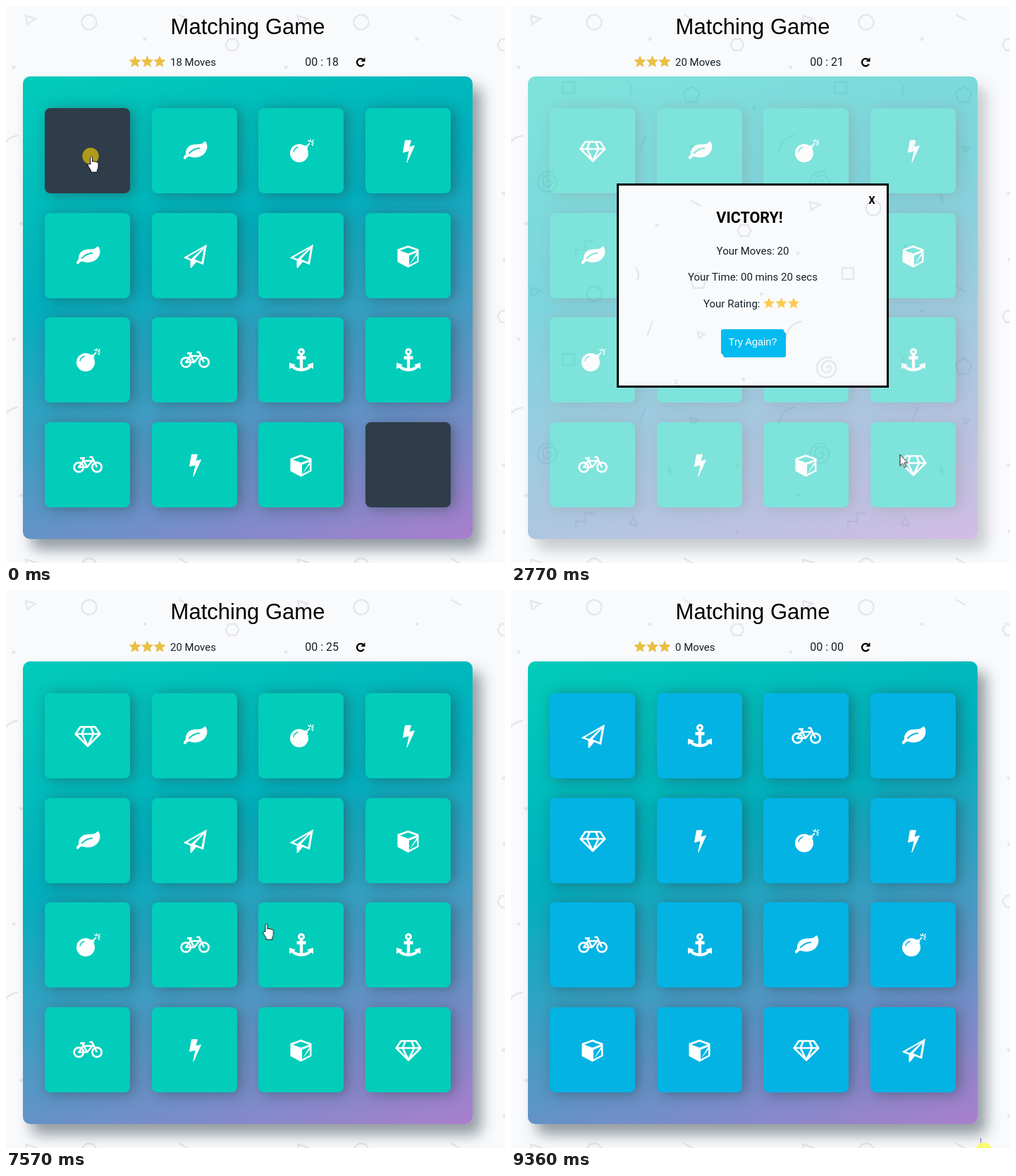
Write an HTML page that moves like this. It is 708 by 791 pixels and loops after 9530 ms.

```html
<!DOCTYPE html>
<html lang="en">
<head>
<meta charset="utf-8">
<title>Matching Game</title>
<style>
  html, body { margin: 0; width: 100%; height: 100%; overflow: hidden; background: #f9fafc; }
  #stage { position: absolute; left: 0; top: 0; width: 708px; height: 791px; overflow: hidden; }
  .layer { position: absolute; left: 0; top: 0; width: 708px; height: 791px; }
  text { font: 15px Roboto, "Open Sans", sans-serif; fill: #14202a; }
  .mid { text-anchor: middle; }
  #deck {
    position: absolute; left: 24px; top: 100px; width: 638px; height: 657px; border-radius: 10px;
    background: linear-gradient(160deg, #02ccba 0%, #00b0bd 37%, #aa7ecd 100%);
    box-shadow: 12px 15px 20px rgba(46, 61, 73, .5);
  }
  .card {
    position: absolute; width: 121px; height: 121px; border-radius: 8px;
    background: currentColor; box-shadow: 5px 2px 19px rgba(46, 61, 73, .5);
  }
  .card svg { position: absolute; left: 35.5px; top: 35.5px; width: 50px; height: 50px; }
  .solid { fill: #fff; }
  .line { fill: none; stroke: #fff; }
  .gap { fill: none; stroke: currentColor; }
  #cursor { position: absolute; left: 0; top: 0; width: 1px; height: 1px; overflow: visible; }
</style>
</head>
<body>
<div id="stage">
  <svg class="layer">
    <defs>
      <g id="shapes" fill="none" stroke="#e5e7ea" stroke-width="2.4">
        <path d="M28 14 42 18 30 26ZM245 12 259 20M74 108H90V124H74Z"/>
        <circle cx="118" cy="23" r="10.5"/>
        <path d="M316 47H326L330.500 55 326 63H316L311.500 55Z"/>
        <path d="M256 114 267.500 122.500 263 136.500H249L244.500 122.500Z"/>
        <path d="M166 107Q174 115 169 126M183 205 191 183M255 199 265 202 257 208Z"/>
        <path id="arc" d="M380 209Q382 187 403 184"/>
        <use href="#arc" x="-386"/>
        <path d="M52 250a3 3 0 0 1 6 0a6.500 6.500 0 0 1-13 0a10 10 0 0 1 20 0a13.500 13.500 0 0 1-27 0A16 16 0 0 1 60 236"/>
        <path d="M222 267 226 269 223 273 228 275 225 279"/>
        <path d="M92 358V346H105V334H118M168 351 173 339 179 352Z"/>
        <path stroke-width="5" stroke-linecap="round" d="M197 47h.01M11 87h.01M345 145h.01M320 266h.01M21.500 309h.01M321 360h.01"/>
      </g>
      <pattern id="tile" width="386" height="386" patternUnits="userSpaceOnUse"><use href="#shapes"/></pattern>
      <pattern id="tile2" width="386" height="386" patternUnits="userSpaceOnUse" patternTransform="translate(10 264)"><use href="#shapes"/></pattern>
      <path id="star" d="M0-8 2.300-2.700 8-2.200 3.700 1.700 5 7.200 0 4.300-5 7.200-3.700 1.700-8-2.200-2.300-2.700Z"/>

      <g id="diamond" class="line" stroke-width="2.700" stroke-linejoin="round">
        <path d="M-10.500-13H10.500L17.300-3 0 14.200-17.300-3ZM-17-3H17M-4.400-13-8.200-3 0 14 8.200-3 4.400-13"/>
      </g>
      <g id="leaf">
        <path class="solid" d="M15.500-13C18.500-8 18-2 14 3C9 9 0 10.500-7 8C-10 7-11 9-13 11C-14 12.500-16.500 11-16 9C-16 7-12.500 6-13 3C-13-3-9-8-2-9.200C5-10 10-9 13-13C14-14 15-14 15.500-13Z"/>
        <path class="gap" stroke-width="2" stroke-linecap="round" d="M-8 3Q-2-3.500 6-4"/>
      </g>
      <g id="bomb">
        <circle class="solid" cx="-3" cy="3" r="13"/>
        <path class="line" stroke-width="5" d="M4-3 8-7"/>
        <path class="line" stroke-width="2" d="M8-7 12-11"/>
        <path class="line" stroke-width="1.400" d="M13-13V-17M14.500-12.500 17.500-16M15-11.500H18M14.500-10 17-7.500M12-13 9.500-15.500"/>
        <path class="gap" stroke-width="1.400" stroke-linecap="round" d="M-11 1Q-10-4-5-5.500"/>
      </g>
      <g id="bolt">
        <path class="solid" stroke="#fff" stroke-linejoin="round" d="M-4.500-15H3.500L.8-5.500 8.500-7.400-2.200 16 1.200-.5-7.500 1.800Z"/>
      </g>
      <g id="plane">
        <path class="solid" fill-rule="evenodd" d="M17-16.500 12 12.500 2 8.500-5 17-6.500 16.500V6.500L-16.500 2.500ZM10.500-10.500-11 2-5.300 4.200ZM12.800-10-.5 4.600 9.500 8.800Z"/>
      </g>
      <g id="cube">
        <path class="solid" fill-rule="evenodd" d="M-.5-15 14.500-9.500V8.500L-.5 16.500-15.500 8.500V-9.500ZM-.5-12-12-7.800-.5-3.400 11-7.800ZM1-.5V13L12-1V-5ZM12-5V7.200L1 13Z"/>
      </g>
      <g id="anchor">
        <circle class="line" cy="-12" r="3.400" stroke-width="3.200"/>
        <path class="line" stroke-width="4.400" d="M0-9V13M-6.500-3.500H6.500"/>
        <path class="line" stroke-width="4.200" d="M-13 8Q-9 13.500 0 13.700Q9 13.500 13 8"/>
        <path class="solid" d="M-17 3.500V12.500L-8 6.500ZM17 3.500V12.500L8 6.500Z"/>
      </g>
      <g id="bike" class="line" stroke-width="2.700" stroke-linejoin="round">
        <circle cx="-12.700" cy="3" r="6.700"/><circle cx="13" cy="3" r="6.700"/>
        <path d="M-12.700 3-6.500-6H6.500L-1 3ZM-1 3-7.500-9.500M-11-9.800H-4M2.500-11.500H6L13 3"/>
      </g>
    </defs>
    <rect width="708" height="791" fill="url(#tile)"/>
    <text class="mid" x="343" y="40" style="font:31px 'Liberation Sans',Arial,sans-serif;fill:#000">Matching Game</text>
    <g fill="#ebc03e" stroke="#d8b444" stroke-width=".5">
      <use href="#star" x="183" y="79"/><use href="#star" x="200.500" y="79"/><use href="#star" x="218" y="79"/>
    </g>
    <g id="moves"></g>
    <g id="timer"></g>
    <path d="M507.800 82.500A5.200 5.200 0 1 1 506.500 76" fill="none" stroke="#000" stroke-width="2.300"/>
    <path d="M509.500 73V79H503.500Z"/>
  </svg>

  <div id="deck"></div>

  <svg class="layer" id="modal">
    <rect x="151.500" y="253.500" width="383" height="287" fill="#f9fafc"/>
    <rect x="151.500" y="253.500" width="383" height="287" fill="url(#tile2)" stroke="#000" stroke-width="3"/>
    <text class="mid" x="512" y="281" style="font-weight:700;fill:#000">X</text>
    <text class="mid" x="338.500" y="308" style="font-size:21.500px;font-weight:700;fill:#000">VICTORY!</text>
    <text class="mid" x="343" y="353">Your Moves: 20</text>
    <text class="mid" x="343" y="390">Your Time: 00 mins 20 secs</text>
    <text x="273" y="428">Your Rating:</text>
    <g fill="#fccb52">
      <use href="#star" x="366" y="422"/><use href="#star" x="383.500" y="422"/><use href="#star" x="401" y="422"/>
    </g>
    <g fill="#04bbf0">
      <rect x="301" y="463" width="89" height="36" rx="3"/>
      <rect x="298" y="459" width="89.500" height="36" rx="3"/>
    </g>
    <rect id="focus" x="297.500" y="458.500" width="90" height="36" rx="3" fill="none" stroke="#4d90fe"/>
    <text class="mid" x="343" y="482" style="font:14.500px 'Liberation Sans',Arial,sans-serif;fill:#fff">Try Again?</text>
  </svg>

  <svg class="layer" id="clicks">
    <path id="tick" d="M666.500 777V784" stroke="#8f8fdc" stroke-width="1.500"/>
  </svg>
  <svg id="cursor" fill="#fff" stroke="#111">
    <path id="arrow" d="M.5.5V16.500L4 13.200 6.800 18.800 9 17.800 6.500 12.200H11.500Z"/>
    <path id="hand" d="M-.5 12V1.800Q1-.5 2.500 1.800V8Q4 6.500 5.500 8.200Q7 7 8.300 8.800Q10.300 7.800 11 10V15Q11 18 9.300 20V23H.5V20.500L-3.600 14Q-4.300 12-2.600 11.200Z"/>
  </svg>
</div>

<script>
const LOOP = 9530;
const WIN = 2770, CLOSE = 7570, RESET = 7660, REVEAL = 8650;
const DARK = '#2e3d49', OPEN = '#02b3e4', MATCH = '#02ccba';
const SVG = 'http://www.w3.org/2000/svg';
const $ = id => document.getElementById(id);
let css = '', count = 0;

// Each key is [ms, declarations, easing to the next key]; the default is a hard change.
function animate(el, keys) {
  const name = 'a' + count++;
  const body = keys.map(([ms, rule, ease = 'step-end']) =>
    `${(ms / LOOP * 100).toFixed(4)}%{${rule};animation-timing-function:${ease}}`).join('');
  css += `@keyframes ${name}{${body}}`;
  const old = el.style.animation;
  el.style.animation = (old ? old + ',' : '') + `${name} ${LOOP}ms linear infinite`;
}

function show(el, ...spans) {
  const keys = [[0, 'opacity:0']];
  for (const [from, to] of spans) keys.push([from, 'opacity:1'], [to, 'opacity:0']);
  animate(el, keys);
}

function add(parent, tag, attrs, text = '') {
  const el = document.createElementNS(SVG, tag);
  for (const k in attrs) el.setAttribute(k, attrs[k]);
  el.textContent = text;
  parent.append(el);
  return el;
}

// Header counters
[['18', 0, 80], ['19', 80, 1230], ['20', 1230, RESET], ['0', RESET, LOOP]].forEach(([n, from, to]) =>
  show(add($('moves'), 'text', { x: 233, y: 85 }, n + ' Moves'), [from, to]));

const ticks = [0, 720, 1750, WIN, 3690, 4650, 5630, 6600, RESET, LOOP];
ticks.slice(0, -1).forEach((from, i) => {
  const sec = from === RESET ? '00' : 18 + i;
  const style = 'font-size:16px;text-anchor:end' + (sec === 20 ? ';fill:#1c6e73' : '');
  show(add($('timer'), 'text', { x: 472, y: 85, style }, '00 : ' + sec), [from, ticks[i + 1]]);
});

// Cards
const first = ('diamond leaf bomb bolt leaf plane plane cube ' +
  'bomb bike anchor anchor bike bolt cube diamond').split(' ');
const second = ('plane anchor bike leaf diamond bolt bomb bolt ' +
  'bike anchor leaf bomb cube cube diamond plane').split(' ');

const turn = deg => `transform:perspective(400px) rotateY(${deg}deg)`;
const flip = (at, len) => [
  [at, turn(90) + ';opacity:0', 'ease-in'],
  [at + len * .4, turn(-20), 'ease-in'],
  [at + len * .6, turn(10) + ';opacity:1', 'ease-in'],
  [at + len * .8, turn(-5), 'ease-in'],
  [at + len, turn(0) + ';opacity:1']
];
const stretch = [[0, 1, 1], [.3, 1.25, .75], [.4, .75, 1.25], [.5, 1.15, .85],
  [.65, .95, 1.05], [.75, 1.05, .95], [1, 1, 1]];
const bounce = (at, len) => stretch.map(([p, x, y]) =>
  [at + p * len, `transform:scale(${x},${y})`, p < 1 ? 'ease' : 'step-end']);

function icon(card, name, from, to) {
  const svg = add(card, 'svg', { viewBox: '-25 -25 50 50' });
  add(svg, 'use', { href: '#' + name });
  show(svg, [from, to]);
}

for (let i = 0; i < 16; i++) {
  const card = document.createElement('div');
  card.className = 'card';
  card.style.left = 31 + i % 4 * 151.7 + 'px';
  card.style.top = 45 + (i >> 2) * 148.7 + 'px';
  $('deck').append(card);

  const opened = i === 0 ? 80 : i === 15 ? 1230 : 0;
  icon(card, first[i], opened, RESET);
  icon(card, second[i], REVEAL, LOOP);

  const tint = [[0, 'color:' + (opened ? DARK : MATCH)]];
  const pose = [[0, turn(0) + ';opacity:1']];
  if (i === 0) {
    tint.push([80, 'color:' + OPEN]);
    pose.push(...flip(80, 500));
  }
  if (opened) {
    tint.push([1230, 'color:' + MATCH]);
    pose.push(...bounce(1230, 690));
  }
  tint.push([RESET, 'color:' + DARK], [REVEAL, 'color:' + OPEN]);
  pose.push(...flip(REVEAL, 480));
  animate(card, tint);
  animate(card, pose);
}

// Victory dialog
animate($('deck'), [[0, 'opacity:1'], [WIN, 'opacity:.5'], [CLOSE, 'opacity:1']]);
show($('modal'), [WIN, CLOSE]);
show($('focus'), [7340, CLOSE]);

// Pointer
const gold = 'rgba(255,212,0,.62)', lemon = 'rgba(255,255,0,.55)';
[[120, 213, 0, 80, gold], [551.5, 636.5, 1000, 1230, gold],
 [368.5, 473, 7340, CLOSE, gold], [671, 795, 9360, LOOP, lemon]].forEach(([cx, cy, from, to, fill]) =>
  show(add($('clicks'), 'circle', { cx, cy, r: 11.7, fill }), [from, to]));
show($('tick'), [8670, LOOP]);

const path = [
  [0, 120, 213], [80, 120, 213, 'ease-in-out'], [780, 551.5, 636.5],
  [4160, 551.5, 636.5, 'ease-in'], [4700, 637, 800],
  [6330, 414, 579, 'ease-out'], [6880, 368.5, 472],
  [7900, 566.5, 611.5], [7980, -50, -50],
  [8290, 569, 738], [8360, 583, 758], [8530, 640, 772], [8590, 666, 777], [8670, -50, -50]
];
animate($('cursor'), path.map(([ms, x, y, ease]) => [ms, `transform:translate(${x}px,${y}px)`, ease]));
show($('hand'), [0, 80], [640, 1230], [6740, 7980]);
show($('arrow'), [80, 640], [1230, 6740], [7980, LOOP]);

const sheet = document.createElement('style');
sheet.textContent = css;
document.head.append(sheet);
</script>
</body>
</html>
```
